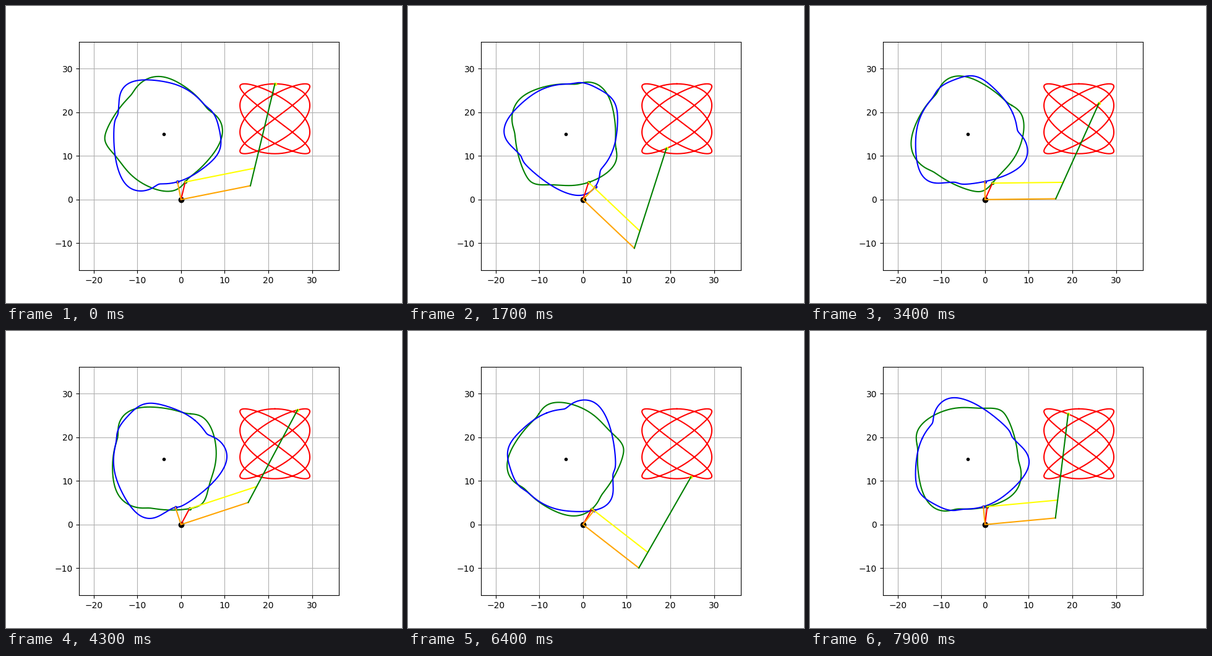
Animation of 640 by 480 pixels, one loop 8 s. Source, as a matplotlib script:

```python
import numpy as np
import matplotlib.pyplot as plt
from matplotlib.animation import FuncAnimation

FRAMES, INTERVAL = 80, 100
STEP = 0.0507                     # cam turn per frame, radians
L1, L2, CRANK = 16.2, 24.0, 4.13  # upper arm, forearm, follower cranks
HUB = np.array([-4.0, 15.0])

# Axes box, position of the data origin and scale, in pixels.
BOX = 118, 52.8, 420, 369.6
ZERO = 282.85, 167.2
SCALE = 7.057


def rotate(pts, a):
    c, s = np.cos(a), np.sin(a)
    return np.array([c * pts[0] - s * pts[1], s * pts[0] + c * pts[1]])


def pose(s):
    """Tip, elbow and the ends of both cranks at cam angle s."""
    tip = np.array([21.5 + 8 * np.sin(4 * s), 18.5 + 8 * np.cos(3 * s)])
    d = np.hypot(*tip)
    bend = np.arccos((L1**2 + d**2 - L2**2) / (2 * L1 * d))
    a = np.arctan2(tip[1], tip[0]) - bend
    elbow = L1 * np.array([np.cos(a), np.sin(a)])
    fore = CRANK * (tip - elbow) / L2
    upper = CRANK * np.array([-np.sin(a), np.cos(a)])
    return tip, elbow, fore, upper


# Each cam is the path of its crank end seen from the turning hub.
turn = np.linspace(0, 2 * np.pi, 501)
curve, _, fore_path, upper_path = pose(turn)
green_cam = rotate(fore_path - HUB[:, None], -turn)
blue_cam = rotate(upper_path - HUB[:, None], -turn)

fig = plt.figure(figsize=(6.4, 4.8), dpi=100)
left, bottom, width, height = BOX
ax = fig.add_axes([left / 640, bottom / 480, width / 640, height / 480])
ax.set_xlim((left - ZERO[0]) / SCALE, (left + width - ZERO[0]) / SCALE)
ax.set_ylim((bottom - ZERO[1]) / SCALE, (bottom + height - ZERO[1]) / SCALE)
ax.set_xticks(range(-20, 31, 10))
ax.set_yticks(range(-10, 31, 10))
ax.grid(True)


def line(color):
    return ax.plot([], [], color=color)[0]


def dot(color):
    return ax.plot([], [], ".", color=color)[0]


ax.plot(*curve, color="red")
ax.plot(0, 0, "o", color="black")
ax.plot(*HUB, ".", color="black")
cam_g, cam_b = line("green"), line("blue")
dot_g, dot_b, dot_tip = map(dot, ("green", "blue", "yellow"))
crank, rod, arm, forearm = map(line, ("red", "yellow", "orange", "green"))


def join(artist, *pts):
    artist.set_data(*np.transpose(pts))


def update(n):
    s = n * STEP
    tip, elbow, fore, upper = pose(s)
    origin = np.zeros(2)
    cam_g.set_data(*(rotate(green_cam, s) + HUB[:, None]))
    cam_b.set_data(*(rotate(blue_cam, s) + HUB[:, None]))
    join(dot_g, fore)
    join(dot_b, upper)
    join(dot_tip, tip)
    join(crank, origin, fore)
    join(rod, fore, fore + elbow)
    join(arm, upper, origin, elbow)
    join(forearm, elbow, tip)
    return cam_g, cam_b, dot_g, dot_b, dot_tip, crank, rod, arm, forearm


anim = FuncAnimation(fig, update, frames=FRAMES, interval=INTERVAL,
                     repeat=True, repeat_delay=0, blit=False)
plt.show()
```
